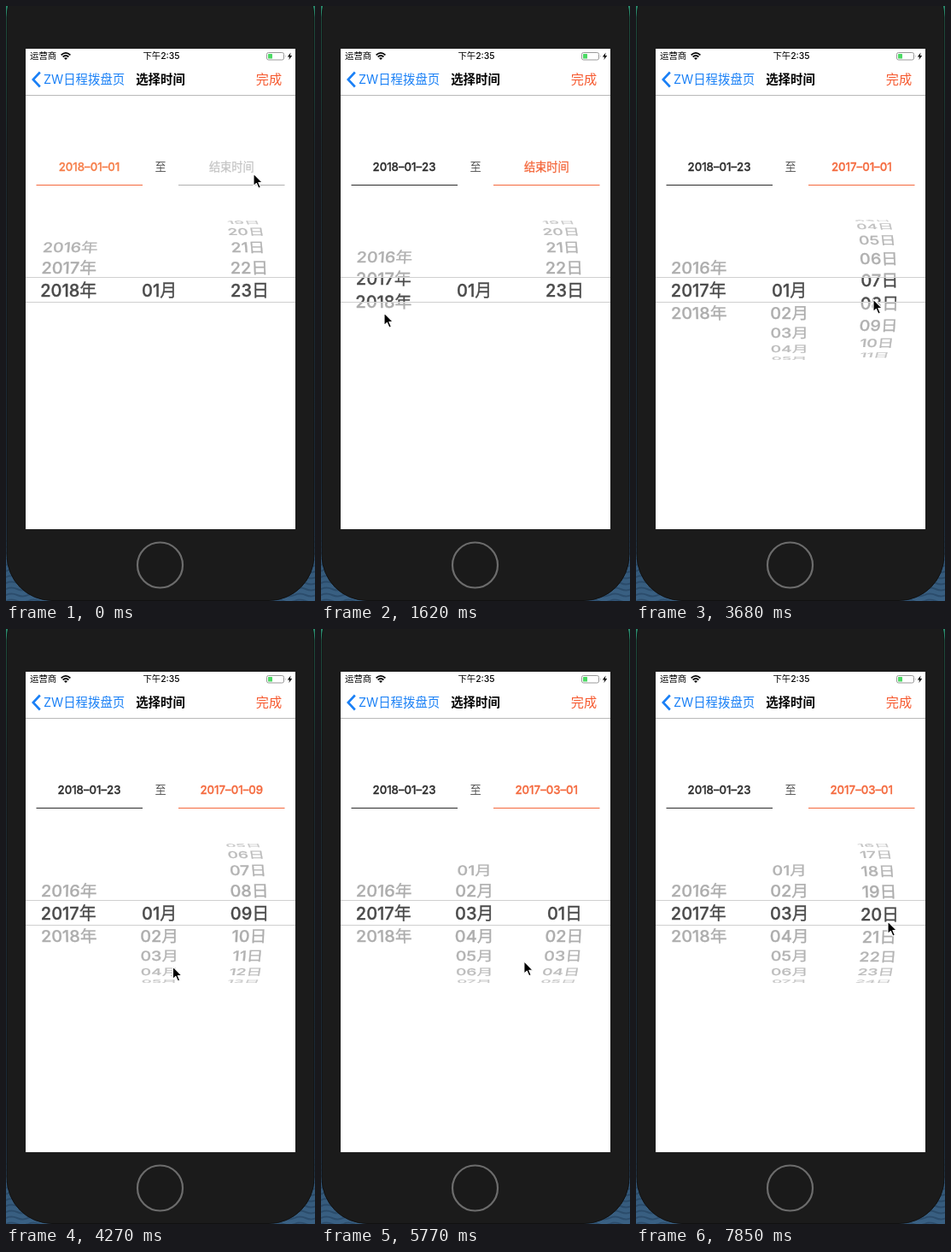
An HTML page for the animation above (7990 ms loop, 362 px wide and 696 px high).

```html
<!DOCTYPE html>
<html lang="zh">
<head>
<meta charset="utf-8">
<title>选择时间</title>
<style>
html, body { margin: 0; width: 100%; height: 100%; overflow: hidden; background: #fff; }
svg { display: block; width: 362px; height: 696px; }
text { font-family: Inter, "Noto Sans CJK SC", "Noto Sans CJK", sans-serif; }
.mid, .field, .wheel { text-anchor: middle; }
.field { font-size: 13.2px; font-weight: 500; stroke-width: .3px; }
.wheel { font-size: 20px; font-weight: 500; stroke-width: .35px; }
</style>
</head>
<body>
<svg viewBox="0 0 362 696">
  <defs>
    <linearGradient id="sea" x1="0" y1="0" x2="0" y2="1">
      <stop offset="0" stop-color="#2b8a6c"/>
      <stop offset=".14" stop-color="#256a5c"/>
      <stop offset=".24" stop-color="#2a4450"/>
      <stop offset=".8" stop-color="#24435f"/>
      <stop offset="1" stop-color="#3a6184"/>
    </linearGradient>
    <pattern id="waves" width="26" height="7" patternUnits="userSpaceOnUse">
      <path d="M0 3Q6.5 0 13 3T26 3" fill="none" stroke="#1d3a55" stroke-width="2" opacity=".5"/>
    </pattern>
    <clipPath id="band"><rect x="23" y="318" width="316" height="28.5"/></clipPath>
    <clipPath id="rest"><path d="M23 250H339V318H23ZM23 346.5H339V414H23Z"/></clipPath>
  </defs>

  <rect width="362" height="696" fill="url(#sea)"/>
  <rect y="620" width="362" height="76" fill="url(#waves)"/>
  <rect x="1" y="-40" width="360" height="735.5" rx="53" fill="#1b1b1b" stroke="#111"/>
  <circle cx="180.5" cy="654" r="26.5" fill="#1a1a1a" stroke="#6c6c6c" stroke-width="2.2"/>
  <rect x="23" y="50" width="316" height="562" fill="#fff"/>

  <g font-size="10.4">
    <text x="28" y="62.3">运营商</text>
    <text x="182" y="62.3" class="mid" font-weight="500">下午2:35</text>
  </g>
  <g fill="none" stroke="#000" stroke-width="1.7">
    <path d="M64.6 57.3Q70 52.3 75.4 57.3M66.6 59.5Q70 56.5 73.4 59.5"/>
    <path d="M70 63L68 60.9Q70 59.4 72 60.9Z" fill="#000" stroke="none"/>
  </g>
  <rect x="305.5" y="54.5" width="20" height="8.5" rx="2" fill="none" stroke="#999"/>
  <rect x="307" y="56" width="5" height="5.5" rx=".5" fill="#4cd964"/>
  <path d="M327 57.3q1.4 1.4 0 2.8z" fill="#999"/>
  <path d="M333.6 54.5L329.8 59.4H332.2L331.4 63L335.2 57.9H332.8Z"/>

  <path d="M39.8 77.5L31.8 86L39.8 94.5" fill="none" stroke="#1a80f6" stroke-width="2.6"/>
  <g font-size="14.4">
    <text x="44" y="91.2" fill="#1a80f6">ZW日程拨盘页</text>
    <text x="181" y="91.2" class="mid" font-weight="700">选择时间</text>
    <text x="308" y="91.4" class="mid" font-size="15.2" fill="#f65a30">完成</text>
  </g>
  <path d="M23 104.5H339" stroke="#b9b9b9"/>

  <text id="start" class="field" x="97.5" y="193"></text>
  <text x="181" y="193" class="mid" font-size="13.2" fill="#555">至</text>
  <text id="end" class="field" x="264.3" y="193"></text>
  <path id="startLine" d="M35.5 209.5H160"/>
  <path id="endLine" d="M202 209.5H326.5"/>

  <g clip-path="url(#rest)"><g id="pale" class="wheel" fill="#acacac" stroke="#acacac"></g></g>
  <g clip-path="url(#band)"><g id="dark" class="wheel" fill="#4a4a4a" stroke="#4a4a4a"></g></g>
  <path d="M23 317.5H339M23 346.5H339" stroke="#d0d0d0"/>

  <path id="cursor" d="M0 0V14.6L3.4 11.5L5.9 17.2L8.3 16.1L5.9 10.6H10.4Z"
    stroke="#fff" stroke-width="1.1" stroke-linejoin="round"/>
</svg>
<script>
const LOOP = 7990, TICK = 148, LAST = 53;
const RADIUS = 82, STEP = 0.33, MID_X = 181, MID_Y = 332.4, DEPTH = 0.09;
const ORANGE = '#f4683c', INK = '#2b2b2b';
const $ = id => document.getElementById(id);

// Stops of the pointer: tick, x, y
const stops = [
  [0, 290, 196], [8, 75, 333], [11, 74, 359], [17, 289, 353], [20, 284, 394],
  [25, 278, 343], [30, 192, 397], [33, 195, 354], [38, 189, 387],
  [41, 277, 390], [43, 277, 390], [45, 288, 391], [48, 288, 392], [51, 295, 342]
];

const progress = (n, a, b) => Math.min(1, Math.max(0, (n - a) / (b - a)));
const easeOut = p => 1 - (1 - p) ** 2;

function spin(n, a, b, from, to) {
  const p = progress(n, a, b);
  return from + (to - from) * p * p * (3 - 2 * p);
}

function pointer(n) {
  let [, x, y] = stops[0];
  for (let i = 1; i < stops.length; i++) {
    const p = easeOut(progress(n, stops[i - 1][0], stops[i][0]));
    x += (stops[i][1] - stops[i - 1][1]) * p;
    y += (stops[i][2] - stops[i - 1][2]) * p;
  }
  return [x, y];
}

// One column of rows wrapped around a cylinder
function column(x, pos, min, max, unit) {
  let rows = '';
  for (let v = Math.max(min, Math.ceil(pos - 4.7)); v <= Math.min(max, pos + 4.7); v++) {
    const angle = (v - pos) * STEP, cos = Math.cos(angle), sin = Math.sin(angle);
    const scale = 1 - DEPTH * (1 - cos), off = x - MID_X;
    const m = [scale, 0, -off * DEPTH * sin / RADIUS, cos, MID_X + off * scale, MID_Y + RADIUS * sin];
    const fade = 0.55 + 0.45 * cos;
    rows += `<text transform="matrix(${m.map(k => k.toFixed(4))})" y="7.3" opacity="${fade.toFixed(2)}">`
      + String(v).padStart(2, '0') + unit + '</text>';
  }
  return rows;
}

function field(id, text, color, lineColor) {
  $(id).textContent = text;
  $(id).setAttribute('fill', color);
  $(id).setAttribute('stroke', color);
  $(id + 'Line').setAttribute('stroke', lineColor);
}

function draw(n) {
  const editingEnd = n >= 4, past = n >= 14, march = n >= 36;
  const startDate = n < 2 ? '2018–01–01' : '2018–01–23';
  const endDate = march ? '2017–03–01' : n >= 28 ? '2017–01–09' : past ? '2017–01–01' : '结束时间';
  field('start', startDate, editingEnd ? INK : '#f67d48', editingEnd ? INK : ORANGE);
  field('end', endDate, editingEnd ? ORANGE : '#c6c6c6', editingEnd ? ORANGE : '#b0b0b0');

  const year = spin(n, 9, 13, 2018, 2017);
  const month = n < 33 ? spin(n, 29, 33, 1, 3.43) : spin(n, 33, 35, 3.43, 3);
  const day = march ? spin(n, 48, LAST, 1, 19.97) : past ? spin(n, 20, 27, 1, 9) : 23;
  const rows = column(73.3, year, 2016, 2018, '年')
    + column(179.7, month, 1, past ? 12 : 1, '月')
    + column(285.5, day, 1, past ? 31 : 23, '日');
  $('pale').innerHTML = rows;
  $('dark').innerHTML = rows;
  $('cursor').setAttribute('transform', `translate(${pointer(n)})`);
}

let shown = -1;
function loop() {
  const t = performance.now() % LOOP;
  const n = Math.min(LAST, Math.floor((t + 25) / TICK));
  if (n !== shown) draw(shown = n);
  requestAnimationFrame(loop);
}
loop();
</script>
</body>
</html>
```
